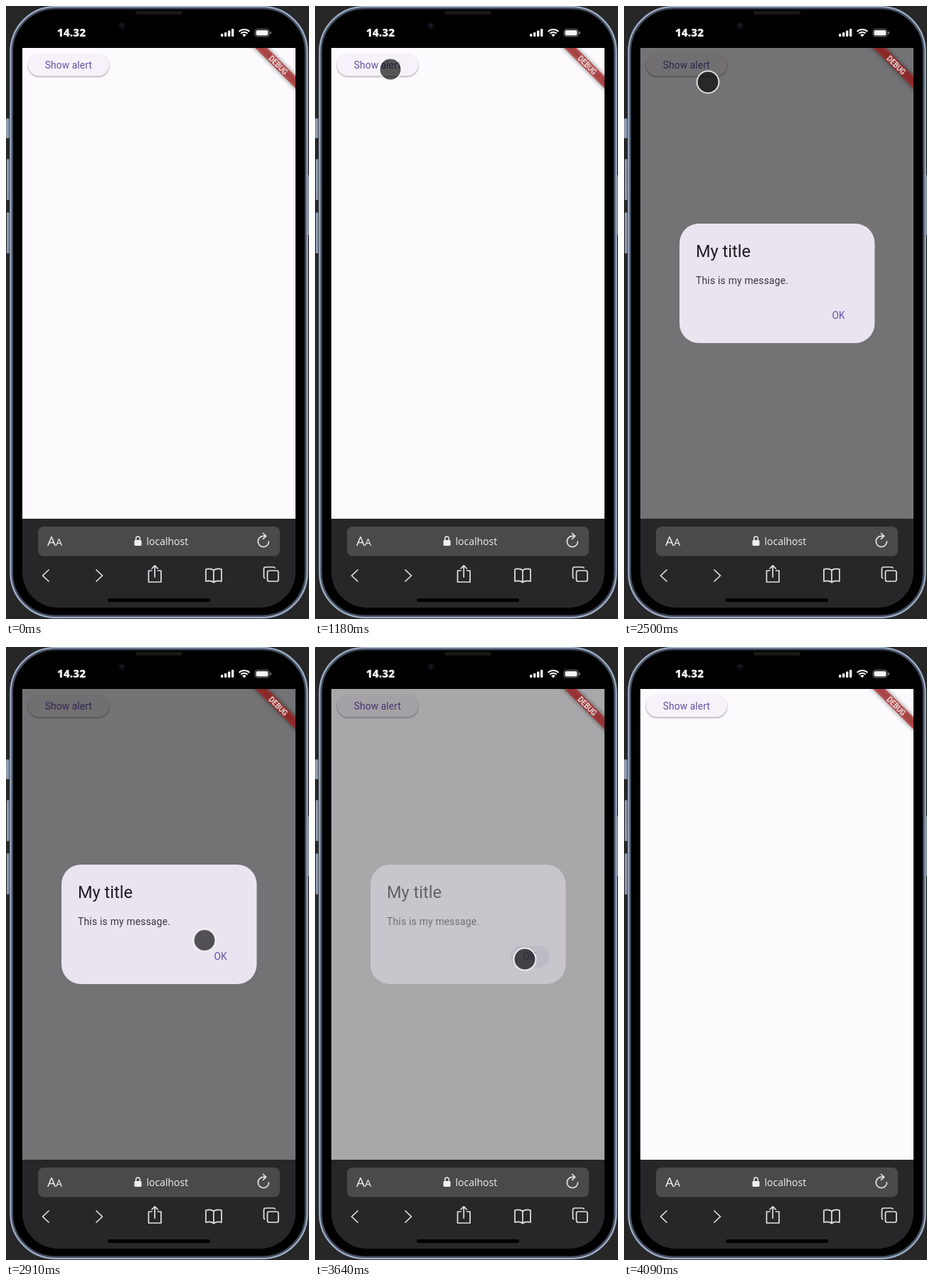
Animation, 426 px wide and 862 px high, one loop 5.09 s. Source, as an HTML page:

```html
<!DOCTYPE html>
<html lang="en">
<head>
<meta charset="utf-8">
<title>Alert dialog on a phone</title>
<style>
  html, body { margin: 0; width: 100%; height: 100%; overflow: hidden; background: #272728; }
  svg { display: block; width: 426px; height: 862px; }
  text { font-family: Roboto, sans-serif; }
  .sys { font-family: "Open Sans", "Noto Sans", sans-serif; fill: #f0f0f0; }
  .icon { fill: none; stroke: #e4e4e6; stroke-width: 1.7; stroke-linecap: round; stroke-linejoin: round; }
  #barrier, #dialog, #cursor, #press, #okPill { opacity: 0; }
</style>
</head>
<body>
<svg viewBox="0 0 426 862">
  <defs>
    <clipPath id="view"><rect x="23" y="59" width="384" height="662"/></clipPath>
    <filter id="soft" x="-20%" y="-50%" width="140%" height="200%"><feGaussianBlur stdDeviation="1.2"/></filter>
    <filter id="glow" x="-20%" y="-100%" width="140%" height="300%"><feGaussianBlur stdDeviation="3"/></filter>
  </defs>

  <!-- phone body -->
  <rect width="426" height="862" fill="#272728"/>
  <g fill="#8e9bae">
    <rect x="0" y="158" width="4.5" height="28" rx="1.5"/>
    <rect x="1" y="215" width="3.5" height="58" rx="1.5"/>
    <rect x="1" y="290" width="3.5" height="58" rx="1.5"/>
    <rect x="424" y="238" width="2" height="84"/>
  </g>
  <rect x="7.5" y="2" width="415" height="857" rx="62" fill="#000" stroke="#454f60" stroke-width="5"/>
  <rect x="6.5" y="1" width="417" height="859" rx="63" fill="none" stroke="#a3b2c8" stroke-width="2"/>
  <rect x="182" y="7" width="66" height="5" rx="2.5" fill="#19191a"/>
  <circle cx="163" cy="28" r="5" fill="#0c0c10"/>
  <circle cx="163" cy="27" r="2" fill="#1d1d28"/>

  <!-- status bar -->
  <text class="sys" x="71.8" y="43" font-size="15.4" font-weight="800">14.32</text>
  <g fill="#f4f4f4">
    <rect x="302" y="39" width="3.4" height="4" rx="1"/>
    <rect x="307" y="37" width="3.4" height="6" rx="1"/>
    <rect x="312" y="34.5" width="3.4" height="8.5" rx="1"/>
    <rect x="317" y="32" width="3.4" height="11" rx="1"/>
    <path d="M335 43.5l-2.8-2.9a4 4 0 0 1 5.6 0z"/>
    <rect x="351.5" y="34" width="17" height="7.5" rx="2"/>
  </g>
  <g fill="none" stroke="#f4f4f4" stroke-width="1.9">
    <path d="M327.6 36a10.5 10.5 0 0 1 14.8 0M330.2 38.7a6.8 6.8 0 0 1 9.6 0"/>
    <rect x="350" y="32.5" width="20" height="10.5" rx="3.2" stroke="#777" stroke-width="1"/>
    <path d="M372 36v3.5" stroke="#8c8c8c" stroke-width="1.5"/>
  </g>

  <!-- web page -->
  <g clip-path="url(#view)">
    <rect x="23" y="59" width="384" height="662" fill="#fcfafd"/>
    <rect x="31" y="68.5" width="114" height="31" rx="15.5" opacity=".4" filter="url(#soft)"/>
    <rect x="31" y="67" width="114" height="31.5" rx="15.75" fill="#f7f2fa"/>
    <rect id="press" x="30.5" y="67" width="115" height="32" rx="16" fill="#4a3c78"/>
    <text x="54.8" y="87.7" font-size="13.8" letter-spacing=".1" fill="#6750a4">Show alert</text>
    <rect id="barrier" x="23" y="59" width="384" height="662" fill-opacity=".54"/>

    <g transform="translate(407 59) rotate(45)">
      <rect x="-60" y="28" width="120" height="12" opacity=".5" filter="url(#glow)"/>
      <rect x="-60" y="28" width="120" height="12" fill="#b71c1c" fill-opacity=".63"/>
      <text x="0" y="37.6" font-size="10.2" font-weight="500" text-anchor="middle" fill="#fff">DEBUG</text>
    </g>

    <g id="dialog">
      <rect x="78" y="306" width="274.5" height="168" rx="27.5" fill="#eae4f0"/>
      <text x="101" y="352.5" font-size="23.6" fill="#1d1b20">My title</text>
      <text x="101" y="391" font-size="13.8" letter-spacing=".25" fill="#38353d">This is my message.</text>
      <rect id="okPill" x="274.5" y="420" width="55.5" height="31" rx="15.5" fill="#d9d0e4"/>
      <text x="292.5" y="440" font-size="13.8" letter-spacing=".1" fill="#6750a4">OK</text>
    </g>

    <g id="cursor">
      <circle r="15" fill-opacity=".65"/>
      <circle r="15.4" fill="none" stroke="#fff" stroke-opacity=".8" stroke-width="2"/>
    </g>
  </g>

  <!-- browser bar -->
  <path d="M23 721H407V796a50 50 0 0 1-50 50H73a50 50 0 0 1-50-50z" fill="#27272a"/>
  <rect x="45" y="732" width="340" height="41.5" rx="8" fill="#4a4a4d"/>
  <text class="sys" x="58" y="759" font-size="19">A<tspan font-size="14.5">A</tspan></text>
  <rect x="180.5" y="751" width="10" height="8" rx="1.5" fill="#f0f0f0"/>
  <path d="M182.7 751v-2.3a2.8 2.8 0 0 1 5.6 0V751" fill="none" stroke="#f0f0f0" stroke-width="1.5"/>
  <text class="sys" x="197.5" y="757.5" font-size="14">localhost</text>
  <g class="icon">
    <path d="M369.5 753a7.600 7.600 0 1 1-7.600-7.600h3M361.500 741.500l4.200 3.900-4.200 3.900"/>
    <path d="M60 793l-8.5 8 8.5 8M127 793l8.5 8-8.5 8"/>
    <path d="M205 794h-4.500v16h17.500v-16H213.500M209.200 803V787M205 791l4.200-4.200 4.200 4.200"/>
    <path d="M292 793.500c-3-2.500-7-2.500-11-1.500v17c4-1 8-1 11 1.500 3-2.500 7-2.500 11-1.500v-17c-4-1-8-1-11 1.500zV810"/>
    <rect x="367.500" y="794" width="15.500" height="15" rx="2.500"/>
    <path d="M363.500 804.500a2 2 0 0 1-1-2V791.500a2.500 2.500 0 0 1 2.500-2.500H376a2 2 0 0 1 2 1.200"/>
  </g>
  <rect x="143" y="833" width="144" height="5" rx="2.5" fill="#000"/>
</svg>

<script>
const LOOP = 5090;

// rows: [time in ms, properties, easing towards the next row]
function play(id, rows) {
  const all = [...rows, [LOOP, rows[rows.length - 1][1]]];
  const frames = all.map(([t, props, easing = 'linear']) => ({ offset: t / LOOP, easing, ...props }));
  document.getElementById(id).animate(frames, { duration: LOOP, iterations: Infinity });
}

const fade = (id, rows) => play(id, rows.map(([t, opacity, easing]) => [t, { opacity }, easing]));
const at = (x, y) => ({ transform: `translate(${x}px, ${y}px)` });
const smooth = u => u * u * (3 - 2 * u);

// Samples a quadratic curve from a over control c to b.
function arc(t0, t1, a, c, b, steps = 16) {
  return Array.from({ length: steps + 1 }, (_, i) => {
    const u = smooth(i / steps), v = 1 - u;
    const mix = k => v * v * a[k] + 2 * u * v * c[k] + u * u * b[k];
    return [t0 + (t1 - t0) * i / steps, at(mix(0), mix(1))];
  });
}

play('cursor', [
  [0, at(396, 369)],
  ...arc(650, 1180, [396, 369], [150, 200], [106, 89]),
  [2465, at(106, 89)],
  [2500, at(118, 107)],
  ...arc(2501, 2980, [118, 107], [212, 270], [288, 431]),
  [3040, at(288, 431), 'ease-out'],
  [3200, at(295, 439)],
  [3800, at(295, 439), 'ease-in'],
  [3990, at(351, 442)],
  [4090, at(410, 446)]
]);
fade('cursor', [[0, 0, 'step-end'], [660, 1, 'step-end'], [4090, 0]]);

fade('press', [
  [0, 0, 'step-end'], [1250, .04, 'step-end'], [1280, .08, 'step-end'],
  [1420, .12, 'step-end'], [1560, .16, 'step-end'],
  [1700, .16], [1910, 0]
]);

fade('barrier', [[0, 0, 'step-end'], [1700, 1], [3560, 1], [3640, .62], [3770, 0]]);
fade('dialog', [[0, 0, 'step-end'], [1700, 1], [3560, 1], [3640, .5], [3720, 0]]);
fade('okPill', [[0, 0], [3080, 0], [3230, 1], [3990, 1, 'step-end'], [4000, 0]]);
</script>
</body>
</html>
```
